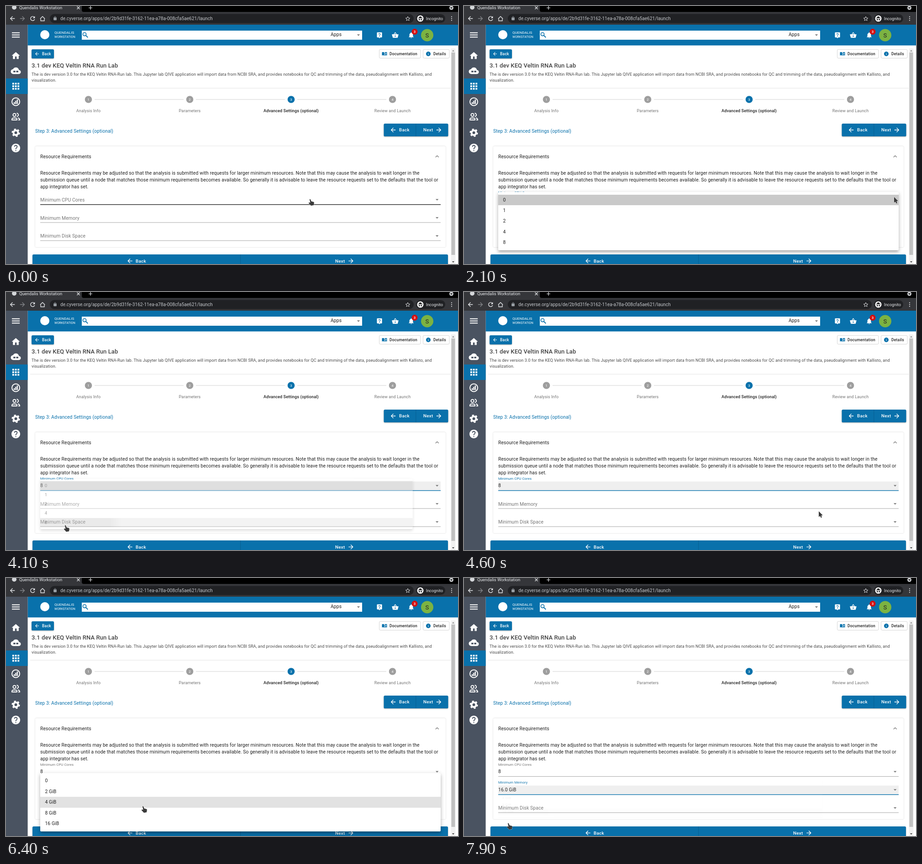
An HTML page for the animation above (8 s loop, 990 by 566 pixels).

```html
<!DOCTYPE html>
<html lang="en">
<head>
<meta charset="utf-8">
<title>Quendalis Workstation</title>
<style>
  html, body { margin: 0; width: 100%; height: 100%; overflow: hidden; background: #fff; }
  svg { position: absolute; left: 0; top: 0; }
  body { font: 10.37px Roboto, sans-serif; color: #212121; }
  text { white-space: pre; }
  .card { filter: drop-shadow(0 .8px 1px #0003); }
  .raised { filter: drop-shadow(0 1.3px 1.2px #0005); }
  #menu {
    position: absolute; left: 75px; width: 877px; padding: 5.2px 0; border-radius: 2.6px;
    background: #fff; letter-spacing: .00938em;
    box-shadow: 0 3.2px 3.2px -2px #0003, 0 5.2px 6.5px .6px #00000024, 0 2px 9px 1.3px #0000001f;
  }
  #menu div { height: 23.4px; line-height: 23.4px; padding-left: 10.4px; }
</style>
</head>
<body>
<svg id="page" width="990" height="566"></svg>
<svg id="fields" width="990" height="566"></svg>
<div id="menu"></div>
<svg id="pointer" width="990" height="566"></svg>
<script>
const BLUE = '#0971ab', SLATE = '#4a5361', INK = '#212121', GREY = '#757575';
const LOOP = 8000, STEP = 100, BODY = 10.37;
const $ = id => document.getElementById(id);

// Drawing helpers; text is placed by the middle of its capitals.
const text = (x, y, s, size = BODY, fill = INK, { weight = 400, anchor = 'start', gap = .00938 } = {}) =>
  `<text x="${x}" y="${y}" dy=".355em" font-size="${size}" fill="${fill}" font-weight="${weight}"
    text-anchor="${anchor}" letter-spacing="${gap}em">${s}</text>`;
const rect = (x, y, w, h, fill, extra = '') =>
  `<rect x="${x}" y="${y}" width="${w}" height="${h}" fill="${fill}" ${extra}/>`;
const circle = (x, y, r, fill, extra = '') => `<circle cx="${x}" cy="${y}" r="${r}" fill="${fill}" ${extra}/>`;
const path = (d, fill, extra = '') => `<path d="${d}" fill="${fill}" ${extra}/>`;
const stroke = (d, color, width = 1) => path(d, 'none', `stroke="${color}" stroke-width="${width}"`);
const at = (x, y, scale, body) => `<g transform="translate(${x} ${y}) scale(${scale}) translate(-12 -12)">${body}</g>`;

// Glyphs on a 24 unit grid.
const DISC = 'M12 2C6.48 2 2 6.48 2 12s4.48 10 10 10 10-4.48 10-10S17.52 2 12 2z';
const MARK = 'm2.07-7.75l-.9.92C13.45 12.9 13 13.5 13 15h-2v-.5c0-1.1.45-2.1 1.17-2.83l1.24-1.26c.37-.36.59-.86.59-1.41 0-1.1-.9-2-2-2s-2 .9-2 2H8c0-2.21 1.79-4 4-4s4 1.79 4 4c0 .88-.36 1.68-.93 2.25z';
const GLYPHS = {
  menu: 'M3 18h18v-2H3zM3 13h18v-2H3zM3 6v2h18V6z',
  home: 'M10 20v-6h4v6h5v-8h3L12 3 2 12h3v8z',
  cloud: 'M19.4 10A7.5 7.5 0 0 0 5.4 8 6 6 0 0 0 6 20h13a5 5 0 0 0 .4-10zM6 12h5v4H6zm7 0h5v4h-5z',
  apps: [4, 10, 16].flatMap(x => [4, 10, 16].map(y => `M${x} ${y}h4v4h-4z`)).join(''),
  help: DISC + 'm1 17h-2v-2h2z' + MARK,
  chat: 'M19 2H5a2 2 0 0 0-2 2v14c0 1.1.9 2 2 2h4l3 3 3-3h4a2 2 0 0 0 2-2V4a2 2 0 0 0-2-2zM13 18h-2v-2h2zm2.07-7.75' + MARK.slice(10),
  info: DISC + 'm1 15h-2v-6h2zm0-8h-2V7h2z',
  back: 'M20 11H7.83l5.59-5.59L12 4l-8 8 8 8 1.41-1.41L7.83 13H20z',
  next: 'M12 4l-1.41 1.41L16.17 11H4v2h12.17l-5.58 5.59L12 20l8-8z',
  less: 'M12 8l-6 6 1.41 1.41L12 10.83l4.59 4.58L18 14z',
  drop: 'M7 10l5 5 5-5z',
  basket: 'M17.2 9L12.8 2.4a1 1 0 0 0-1.6 0L6.8 9H2a1 1 0 0 0-1 1.3l2.6 9.2A2 2 0 0 0 5.5 21h13a2 2 0 0 0 1.9-1.5L23 10a1 1 0 0 0-1-1zM9 9l3-4.4L15 9zm3 8a2 2 0 1 1 0-4 2 2 0 0 1 0 4z',
  bell: 'M12 22a2 2 0 0 0 2-2h-4a2 2 0 0 0 2 2zm6-6v-5c0-3.1-1.6-5.6-4.5-6.3V4a1.5 1.5 0 0 0-3 0v.7C7.6 5.4 6 7.9 6 11v5l-2 2v1h16v-1z',
  lock: 'M18 8h-1V6A5 5 0 0 0 7 6v2H6a2 2 0 0 0-2 2v10c0 1.1.9 2 2 2h12a2 2 0 0 0 2-2V10a2 2 0 0 0-2-2zM9 8V6a3 3 0 0 1 6 0v2z',
  book: 'M1 5q6-2 10 1v14q-5-3-10-1zM13 6q4-3 10-1v14q-5-2-10 1zM15 9v2l6-1V8zm0 4v2l6-1v-2z'
};
const icon = (name, x, y, scale, fill = '#fff') =>
  at(x, y, scale, path(GLYPHS[name], fill, 'fill-rule="evenodd"'));

function browserBar() {
  const light = '#e8eaed', dark = '#202124';
  const dots = [-4, 0, 4].map(d => circle(976, 27.5 + d, 1.1, light)).join('');
  return rect(0, 0, 990, 41, '#000') + path('M0 0H166V9q0 4 4 4H990V41H0z', '#35363a') +
    circle(18, 3, 5, '#d5d7da') + text(29, 4, 'Quendalis Workstation', 9.4, light, { gap: 0 }) +
    stroke('M155.5 1l6 6m0-6l-6 6M181 4h8M185 0v8', light, 1.2) +
    circle(975.5, 4, 4.5, '#c8cacd') + path('M973 3h5l-2.5 3z', '#000') +
    icon('back', 14, 27.5, .66, light) + icon('next', 36, 27.5, .66, '#84868a') +
    stroke('M62 24.5A4.6 4.6 0 1 0 62.8 29', light, 1.4) + path('M63.3 22.2v4.6h-4.6z', light) +
    stroke('M76 28v4.5h8V28M74.800 28L80 23l5.2 5', light, 1.3) +
    rect(96, 17.5, 797, 20, dark, 'rx="10"') + icon('lock', 107.5, 27, .42, '#9aa0a6') +
    text(119, 27.5, 'de.cyverse.org/apps/de/2b9d31fe-3162-11ea-a78a-008cfa5ae621/launch', 10.18, '#c4c7cb', { gap: 0 }) +
    stroke('M880 23l1.3 3.2 3.5.3-2.7 2.2.9 3.4-3-1.9-3 1.9.9-3.4-2.7-2.2 3.5-.3z', light, .9) +
    rect(898, 18, 64, 19, dark, 'rx="9.5"') + circle(907.5, 27.5, 7, '#fff') +
    path('M902.5 27h10v-1h-2l-1-3h-4l-1 3h-2z', dark) +
    circle(905.3, 29.8, 1.6, dark) + circle(909.7, 29.8, 1.6, dark) +
    text(920, 27.5, 'Incognito', 8.9, light, { gap: 0 }) + dots;
}

function sidebar() {
  const bars = [[17, 4], [20.3, 7], [23.6, 10]].map(([x, h]) => rect(x, 215 - h, 2.3, h, '#fff')).join('');
  const people = circle(18.5, 239, 3.2, 'none', 'stroke="#fff" stroke-width="1.9"') +
    stroke('M13 250v-1.5q0-3 5.5-3t5.5 3v1.5zM23.5 235.3a3.5 3.5 0 0 1 0 7.2M26 245.5q4 1 4 4v.5h-3', '#fff', 1.9);
  const gear = circle(21.5, 278, 5, 'none', 'stroke="#fff" stroke-width="4"') +
    circle(21.5, 278, 7.6, 'none', 'stroke="#fff" stroke-width="3" pathLength="12" stroke-dasharray="1 1"');
  return rect(0, 41, 47.5, 525, SLATE) + rect(0, 159, 47.5, 34, BLUE) +
    icon('menu', 21.5, 63.5, .95) + icon('home', 21.5, 109, .9) + icon('cloud', 21.5, 142, .9) +
    icon('apps', 21.5, 176, .95) + circle(21.5, 210, 8.5, 'none', 'stroke="#fff" stroke-width="2"') +
    bars + people + gear + icon('help', 21.5, 311.5, .95);
}

function header() {
  return rect(47.5, 41, 942.5, 45.5, BLUE) + circle(85, 63, 10, '#fff') +
    text(106, 58, 'QUENDALIS', 8, '#fff', { gap: .01 }) + text(106, 68, 'WORKSTATION', 6.7, '#fff', { gap: 0 }) +
    rect(166, 54, 614, 20, '#fff') +
    circle(172, 61.8, 3.6, 'none', `stroke="${BLUE}" stroke-width="1.6"`) + stroke('M174.6 64.4l4.6 4.6', BLUE, 1.9) +
    text(711, 62.5, 'Apps') + icon('drop', 772, 63.5, .65, GREY) +
    icon('chat', 818, 64, .62) + icon('basket', 852.5, 64, .65) + icon('bell', 887.5, 64, .65) +
    circle(895, 56.3, 6.5, '#d50f0f') + text(895, 56.3, '3', 7.8, '#fff', { anchor: 'middle', weight: 500 }) +
    circle(922.5, 64, 13.5, '#7cb342') + text(922.5, 64, 'S', 13, INK, { anchor: 'middle' });
}

const label = (x, y, s, size, fill = '#fff') => text(x, y, s, size, fill, { weight: 500, gap: .02857 });
const outlined = (x, w) => rect(x, 95.3, w, 19.2, '#fff', 'rx="2.6" stroke="#0000003b" stroke-width=".7"');
const raised = (x, y, w, h) => rect(x, y, w, h, BLUE, 'rx="2.6" class="raised"');

function stepper() {
  const names = ['Analysis Info', 'Parameters', 'Advanced Settings (optional)', 'Review and Launch'];
  return names.map((name, i) => {
    const x = 180.5 + i * 222, active = i === 2;
    return circle(x, 205, 7.8, active ? BLUE : '#9e9e9e') +
      text(x, 205, i + 1, 7.8, '#fff', { anchor: 'middle', gap: 0 }) +
      text(x, 230, name, 9.1, active ? INK : GREY, { anchor: 'middle', weight: active ? 500 : 400, gap: .01071 }) +
      (i < 3 ? rect(x + 13.5, 204.7, 195, .7, '#bdbdbd') : '');
  }).join('');
}

function content() {
  const about = ['The is dev version 3.0 for the KEQ Veltin RNA-Run lab. This Jupyter lab QIVE application will import data from NCBI SRA, and provides notebooks for QC and trimming of the data, pseudoalignment with Kallisto, and', 'visualization.'];
  const notes = ['Resource Requirements may be adjusted so that the analysis is submitted with requests for larger minimum resources. Note that this may cause the analysis to wait longer in the',
    'submission queue until a node that matches those minimum requirements becomes available. So generally it is advisable to leave the resource requests set to the defaults that the tool or', 'app integrator has set.'];
  return raised(56, 95, 49, 20) + icon('back', 68, 105, .5) + label(79, 105, 'Back', 8.45) +
    outlined(817.5, 90.5) + icon('book', 829, 105, .5, BLUE) + label(840, 105, 'Documentation', 8.45, INK) +
    outlined(913.5, 57.5) + icon('info', 925, 105, .5, BLUE) + label(936, 105, 'Details', 8.45, INK) +
    text(56, 130.7, '3.1 dev KEQ Veltin RNA Run Lab', 13, '#424242', { weight: 500, gap: .0075 }) +
    about.map((s, i) => text(56, 150 + i * 12.5, s, 9.1, '#4a4a4a', { gap: .01071 })).join('') +
    rect(53, 179.8, 921, .8, '#dcdcdc') + stepper() +
    text(64, 274.5, 'Step 3: Advanced Settings (optional)', BODY, BLUE) +
    raised(827.5, 258, 141, 28) + rect(897.5, 258, .7, 28, '#075a89') +
    icon('back', 848, 272, .65) + label(861, 272, 'Back', 9.75) + label(914, 272, 'Next', 9.75) + icon('next', 948, 272, .65) +
    rect(64, 307.5, 899, 221.5, '#fff', 'rx="2.6" class="card"') +
    text(75, 330.3, 'Resource Requirements') + icon('less', 944.3, 330, .65, GREY) +
    notes.map((s, i) => text(75, 366 + i * 15.4, s)).join('') +
    raised(58, 545, 910, 28) + rect(513, 545, .7, 28, '#075a89') +
    icon('back', 271.5, 559.3, .65) + label(284, 559.3, 'Back', 9.75) +
    label(721, 559.3, 'Next', 9.75) + icon('next', 755.5, 559.3, .65) +
    rect(974.5, 93, 10, 473, '#f1f1f1') + rect(975.5, 102, 8, 444, '#c1c1c1') +
    path('M977 99.5h5l-2.5-3z', '#8a8a8a') + path('M977 560h5l-2.5 3z', '#404040');
}

$('page').innerHTML = browserBar() + header() + sidebar() + content();

// Pointer stops: time, tip x, tip y, hand shape.
const STOPS = [
  [0, 666, 424, 1], [300, 666, 424, 1], [400, 690, 405, 0], [700, 850, 300, 0], [800, 872, 293, 0],
  [900, 890, 300, 0], [1200, 925, 359, 0], [1400, 941, 412, 1], [1500, 942, 419, 1], [1800, 942, 419, 0],
  [3400, 942, 419, 0], [3500, 130, 512, 1], [4100, 130, 512, 1], [4200, 190, 508, 0], [4600, 777, 481, 0],
  [4700, 850, 473, 0], [4800, 850, 473, 0], [4900, 885, 468, 1], [5100, 939, 460, 1], [5700, 939, 460, 0],
  [6100, 939, 460, 0], [6200, 800, 466, 1], [6400, 300, 501, 1], [6500, 300, 501, 1], [6600, 200, 515, 1],
  [6800, 67, 532, 1], [7000, 97, 538, 1], [LOOP, 97, 538, 1]
];
// Menu looks hold until the next entry: time, opacity, scale.
const FIELDS = [
  { name: 'Minimum CPU Cores', y: 425.3, focus: 1700, blur: 5500, set: 4000, value: '8', click: 3900, selected: 0,
    items: ['0', '1', '2', '4', '8'],
    menu: [[1800, .3, .85], [1900, .75, .95], [2000, .95, .99], [2100, 1, 1], [4000, .85, 1], [4100, .4, .93], [4200, .04, .81], [4300, 0, 1]] },
  { name: 'Minimum Memory', y: 465, focus: 5500, blur: LOOP, set: 7700, value: '16.0 GiB', click: 7500,
    items: ['0', '2 GiB', '4 GiB', '8 GiB', '16 GiB'],
    menu: [[5700, 1, 1], [7700, .85, 1], [7900, .04, .81]] },
  { name: 'Minimum Disk Space', y: 504.8, focus: LOOP, blur: LOOP, set: LOOP, menu: [] }
];
// The first row lies over its field, unless the menu would reach below this top.
const LOWEST_MENU_TOP = 428.2, MENU_LIFT = 16.9, ROW = 23.4, PADDING = 5.2;

function pointerAt(t) {
  const i = STOPS.findLastIndex(s => s[0] <= t);
  const [t0, x0, y0, hand] = STOPS[i], [t1, x1, y1] = STOPS[i + 1];
  const k = (t - t0) / (t1 - t0);
  return { x: x0 + (x1 - x0) * k, y: y0 + (y1 - y0) * k, hand };
}

function drawField(f, t, p) {
  const focused = t >= f.focus && t < f.blur;
  const float = Math.min(1, Math.max(0, (t - f.focus) / 200));
  const hovered = p.hand && Math.abs(p.y - f.y) < 10 && t < 5500 && !(t >= 1800 && t < 4300);
  const [line, width] = focused ? [BLUE, 1.4] : hovered ? [INK, 1.4] : ['#8f8f8f', .8];
  return (focused ? rect(75, f.y - 9.6, 877, 19.4, '#efefef') : '') +
    text(75, f.y - 16.3 * float, f.name, BODY * (1 - .25 * float), focused ? BLUE : GREY) +
    (t >= f.set ? text(75, f.y - .5, f.value) : '') +
    icon('drop', 944.2, f.y - .5, .65, GREY) + rect(75, f.y + 9.6, 877, width, line);
}

function drawMenu(t, p) {
  const menu = $('menu');
  const f = FIELDS.findLast(f => f.menu.length && t >= f.menu[0][0]);
  const [, opacity, scale] = f ? f.menu.findLast(m => m[0] <= t) : [0, 0, 1];
  menu.style.display = opacity ? 'block' : 'none';
  if (!opacity) return;
  const top = Math.min(f.y - MENU_LIFT, LOWEST_MENU_TOP);
  menu.style.top = top + 'px';
  menu.style.opacity = opacity;
  menu.style.transformOrigin = `0 ${f.y - top}px`;
  menu.style.transform = scale < 1 ? `scale(${scale}, ${scale * scale})` : 'none';
  const over = p.hand ? Math.floor((p.y - top - PADDING) / ROW) : -1;
  menu.innerHTML = f.items.map((item, i) => {
    let fill = i === f.selected ? '#c9c9c9' : i === over ? '#e2e2e2' : '#fff';
    if (i === over && t >= f.click) fill = `radial-gradient(circle at ${p.x - 75}px 50%, #cdcdcd 110px, #e2e2e2 135px)`;
    return `<div style="background:${fill}">${item}</div>`;
  }).join('');
}

const HAND = 'M-1 .8Q-1-.7.5-.3L3 4.7 7.5 5.7Q9 6.2 8.8 7.8L8 13 2 14-2.8 8.7Q-3.8 7-2 6.9L.5 7.6z';
const ARROW = 'M0 0V12.6L2.9 10.3 4.8 14.2 7 13.2 5.3 9.5 8.6 8.8z';

function drawPointer({ x, y, hand }) {
  $('pointer').innerHTML = path(hand ? HAND : ARROW, '#3a3a3a',
    `transform="translate(${x} ${y})" stroke="#fff" stroke-width=".6" paint-order="stroke"`);
}

let shown = -1;
function frame(now) {
  const t = Math.floor(now % LOOP / STEP) * STEP;
  if (t !== shown) {
    shown = t;
    const p = pointerAt(t);
    $('fields').innerHTML = FIELDS.map(f => drawField(f, t, p)).join('');
    drawMenu(t, p);
    drawPointer(p);
  }
  requestAnimationFrame(frame);
}
frame(performance.now());
</script>
</body>
</html>
```
